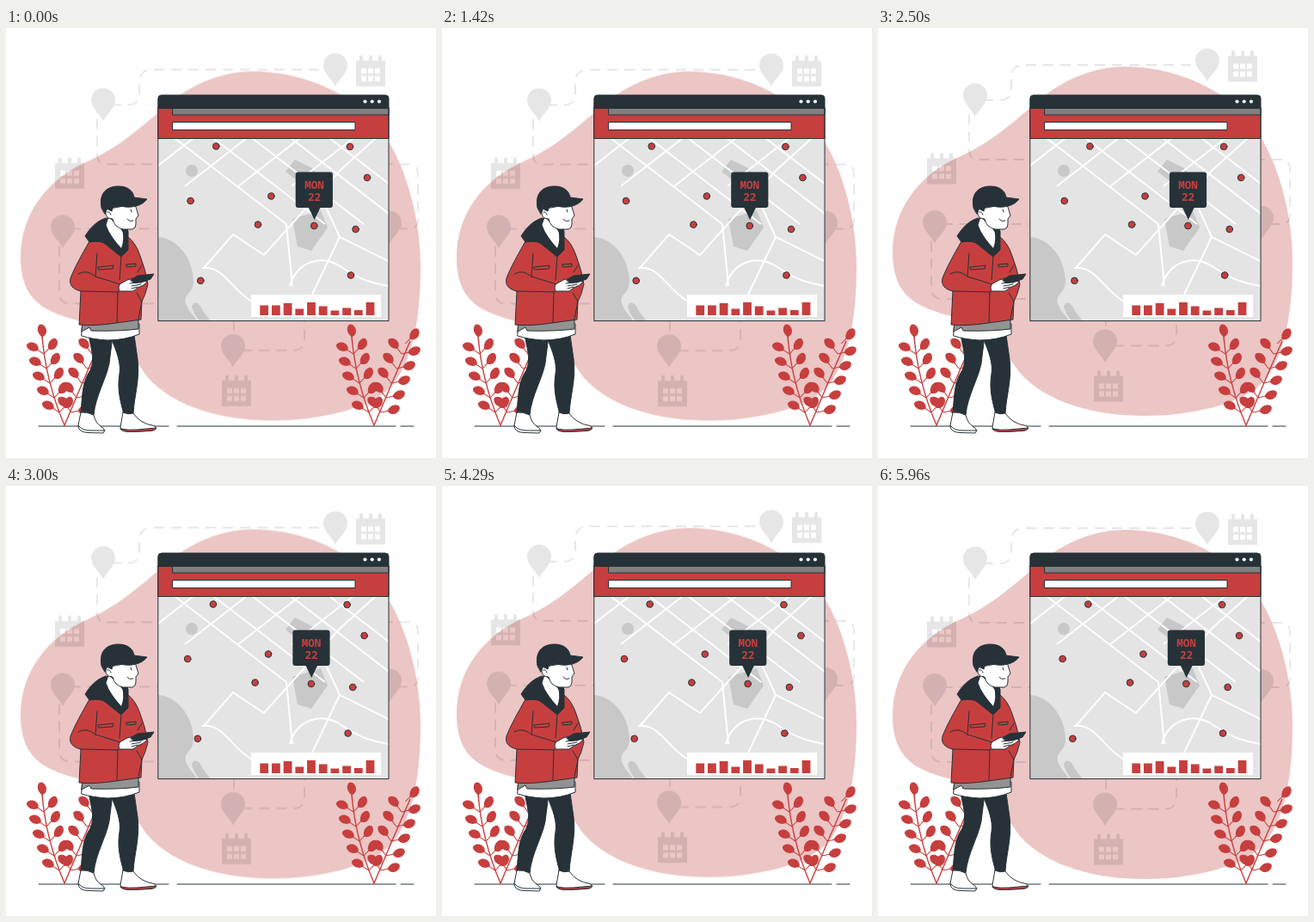
Write an HTML page that moves like this. It is 500x500 px and loops after 6 s.

```html
<!DOCTYPE html>
<html lang="en">
<head>
<meta charset="utf-8">
<title>Map search</title>
<style>
  html, body { margin: 0; width: 100%; height: 100%; overflow: hidden; background: #fff; }
  svg { display: block; width: 100vw; height: 100vh; }
  .red { fill: #c63f3e; }
  .dark { fill: #263238; }
  .white { fill: #fff; }
  .line { fill: none; }
  .edge { stroke: #263238; stroke-width: 1; stroke-linejoin: round; stroke-linecap: round; }
  .road { stroke: #fff; stroke-width: 2; }
  .stem { stroke: #c63f3e; stroke-width: 1.4; }
  .float { animation: float 1500ms linear -41.67ms infinite; }
  .shake { animation: shake 6000ms linear -41.67ms infinite; }
  @keyframes float {
    50% { transform: translateY(-10px); }
  }
  @keyframes shake {
    0%, 100% { transform: translateX(0); }
    10%, 90% { transform: translateX(-1px); }
    20%, 80% { transform: translateX(2px); }
    30%, 50%, 70% { transform: translateX(-4px); }
    40%, 60% { transform: translateX(4px); }
  }
  .date { font: 700 12.5px "Noto Sans Mono", "DejaVu Sans Mono", monospace; text-anchor: middle; }
</style>
</head>
<body>
<svg viewBox="0 0 500 500">
  <defs>
    <path id="pin" d="M0 24.500C-4 16-14 9-14 0A14 14 0 0 1 14 0C14 9 4 16 0 24.500Z"/>
    <path id="calendar" fill-rule="evenodd" d="M0 6H4V0H8V6H15V0H19V6H26V0H30V6H34V36H0Z
      M6 15V21H12V15ZM14 15V21H20V15ZM22 15V21H28V15ZM6 24V30H12V24ZM14 24V30H20V24ZM22 24V30H28V24Z"/>
    <path id="leaf" d="M0-.5H8C11-5 18-7 22-3C24 0 20 5 15 5C11 5 9 3 8 .5H0Z"/>
    <clipPath id="map"><rect x="177" y="128" width="268" height="213"/></clipPath>
  </defs>

  <!-- floating backdrop -->
  <g class="float">
    <path fill="#ecc5c5" d="M17 267C17 215 50 176 92 157C130 140 152 120 177 99C210 67 250 51 287 51C340 51 392 72 425 106C458 140 482 210 482 278C482 335 474 385 450 415C425 445 360 457 310 457C255 457 197 443 165 407C145 380 135 356 100 345C55 333 17 326 17 267Z"/>
    <g opacity=".1">
      <path class="line" stroke="#000" stroke-width="1.8" stroke-dasharray="12 8" d="M384 49H170Q155 49 155 64V76Q155 90 142 90H118Q106 90 106 101V148Q106 159 117 159H468Q479 159 479 170V223Q479 234 468 234H74Q62 234 62 246V308Q62 321 75 321H253Q265 321 265 333V364Q265 375.500 276 375.500H334Q347 375.500 347 362V335"/>
      <g id="marks"></g>
    </g>
  </g>

  <path class="line edge" d="M38 463H189M199 463H453M459 463H474"/>
  <g id="plant" class="red"></g>
  <use href="#plant" x="360"/>

  <!-- browser window -->
  <rect x="177" y="93" width="268" height="248" fill="#e4e4e4"/>
  <g clip-path="url(#map)">
    <g fill="#c8c8c8">
      <path d="M177 243C196 244 217 264 218 294C218 309 206 309 209 320C212 330 219 334 222 341H177Z"/>
      <path d="M216 324C218 317 224 319 227 325C230 332 235 336 238 341H225Q218 332 216 324Z"/>
      <circle cx="216" cy="166" r="7"/>
      <path d="M325 167L336 153L356 163L368 180L350 186Z"/>
      <path d="M333 222L366 212L374 232L355 259L339 254Z"/>
    </g>
    <g id="roads" class="line road"></g>
    <path class="line road" d="M230 279L264 240L300 264L388 166L430 128M326 228L333 300M371 206L388 243L445 271M388 243L356 310
      M330 300C338 272 366 262 390 278S424 296 445 300M228 279C254 276 261 304 286 318"/>
  </g>
  <rect class="white" x="285" y="310" width="151" height="26"/>
  <g id="bars" class="red"></g>
  <path class="red edge" d="M176.800 93H445V128.500H176.800Z"/>
  <path class="edge" fill="#808080" d="M194 93H445V101H194Z"/>
  <rect class="white edge" x="194" y="109.500" width="212" height="9"/>
  <path class="dark edge" d="M176.800 93V82Q177 78 181 78H441Q445 78 445 82V93Z"/>
  <g id="buttons" class="white"></g>
  <path class="line edge" d="M176.800 93V340.600H445V93"/>

  <g class="shake">
    <g id="dots" class="red edge"></g>
    <rect class="dark" x="336.800" y="167.500" width="43.200" height="41.500" rx="3"/>
    <path class="dark" d="M351.500 208L358.700 223L366 208Z"/>
    <g class="date red"><text x="358.500" y="186.500">MON</text><text x="358.500" y="201">22</text></g>
  </g>

  <!-- walker -->
  <g>
    <path class="dark edge" d="M122 360C129 377 134 390 132 402C129 420 133 434 137 449L148 448C149 428 156 408 153 385L149 357Z"/>
    <path class="dark edge" d="M96 356C98 370 104 385 98 398C88 412 89 428 87 447L102 450C104 428 117 407 120 390L124 358Z"/>
    <path class="white edge" d="M87 447L84 462Q84 470 95 470.500L113 471Q117 467 110 463Q104 459 102 450Q94 446 87 447Z"/>
    <path class="line edge" d="M84 462Q88 468 98 468L115 468"/>
    <path class="white edge" d="M136 447L133 464Q134 470 148 469.500L170 468Q177 465 172 462.500Q156 460 148 448Q142 450 136 447Z"/>
    <path class="red edge" d="M133 466Q142 468 153 467L175 465Q174 468 168 468.500L148 469.500Q134 470 133 466Z"/>
    <path class="white edge" d="M89 346L155 344V356Q138 363 118 363Q100 362 88 358Z"/>
    <path class="edge" fill="#929292" d="M90 337L154 334V350Q130 353 99 352L97 348L88 353Z"/>
    <path class="red edge" d="M97 248C88 264 79 280 75 291C73 299 78 304 87 306L85 345Q102 347 128 343L157 339L158 318Q162 311 165 298Q162 280 156 265Q151 250 142 243L120 240Z"/>
    <path class="line edge" d="M134 266L132 293M130 306L129 342M87 306L131 307M106 262L104 289L133 298M84 286Q94 280 104 289M107 278L125 276L124 280L108 281ZM140 275L151 274L151 277L141 278ZM152 308L158 318L154 338M153 284L158 276"/>
    <path class="dark edge" d="M116 221C104 225 97 234 92 242L97 249Q108 247 114 250L134 266L142 258L142 236L134 230Z"/>
    <path class="white edge" d="M119 220L116 229Q121 244 135 258Q139 247 137 238L131 230Z"/>
    <path class="white edge" d="M117 211Q114 217 119 221L124 222Q126 232 136 234H147Q151 233 151 228L151 222L154 218L150 205Z"/>
    <path class="dark" d="M135 234L142 234L141 258L134 266L117 241L116 231Q124 245 134 256Q138 246 135 234Z"/>
    <path class="line edge" d="M141 222.500Q144 226 148 224M145 211L146 214M118 214Q121 213 122 217"/>
    <path class="dark edge" d="M111 209C108 193 116 184 131 184C142 184 148 190 149 197L164 199C158 207 146 209 139 208Q129 206 124 209L123 213L117 210L115 216Z"/>
    <path class="white edge" d="M132 298L141 293L148 291L158 293L164 295L160 299L153 302L148 306L132 306Q130 302 132 298Z"/>
    <path class="dark edge" d="M145 293L153 288L172 286L168 292L157 296L148 296Z"/>
    <path class="line edge" d="M144 297L154 296M146 300L157 298M146 303L153 301"/>
  </g>
</svg>
<script>
  const range = n => [...Array(n).keys()];
  const add = (id, items, draw) => {
    document.getElementById(id).innerHTML += items.map(draw).join('');
  };
  const place = kind => ([x, y]) => `<use href="#${kind}" x="${x}" y="${y}"/>`;

  add('marks', [[383, 44], [113, 84.5], [66, 232], [446, 227], [264, 370.5]], place('pin'));
  add('marks', [[407, 32.5], [57, 151.5], [251, 404.5]], place('calendar'));

  add('buttons', range(3), i => `<circle cx="${417.5 + i * 8.2}" cy="85.5" r="2.1"/>`);

  add('bars', [11.5, 11.5, 14, 7.5, 15, 10.5, 5.5, 8.5, 6, 15],
    (h, i) => `<rect x="${295.3 + i * 13.7}" y="${334 - h}" width="9.8" height="${h}"/>`);

  add('dots', [
    [244.3, 137.5], [400, 138], [420, 174], [308.4, 195.5], [214.6, 201],
    [293, 228.6], [358.3, 230], [406.6, 234], [226.3, 293.8], [401, 287.5]
  ], ([x, y]) => `<circle cx="${x}" cy="${y}" r="3.8"/>`);

  // two families of parallel streets
  add('roads', range(5), i => `<path d="M${196 + i * 45} 128l130 100"/>`);
  add('roads', range(4), i => `<path d="M${218 + i * 62} 128l-72 56"/>`);

  // leaf pairs climb each stem at even heights
  const leaf = (x, y, turn) =>
    `<use href="#leaf" transform="translate(${x} ${y}) rotate(${turn})"/>`;
  const branch = (stemX, left, right, tip) => range(5).map(i => {
    const x = stemX(i), y = 379 + i * 17;
    return leaf(x, y, left) + leaf(x, y, right);
  }).join('') + leaf(stemX(-.7), 367, tip);

  add('plant', [
    '<path class="line stem" d="M42 358Q46 410 68 462Q88 414 110 364"/>',
    branch(i => 44 + 2.5 * i + i * i / 2, -147, -47, -92),
    branch(i => 100 - 6 * i, -127, -12, -45)
  ], part => part);
</script>
</body>
</html>
```
